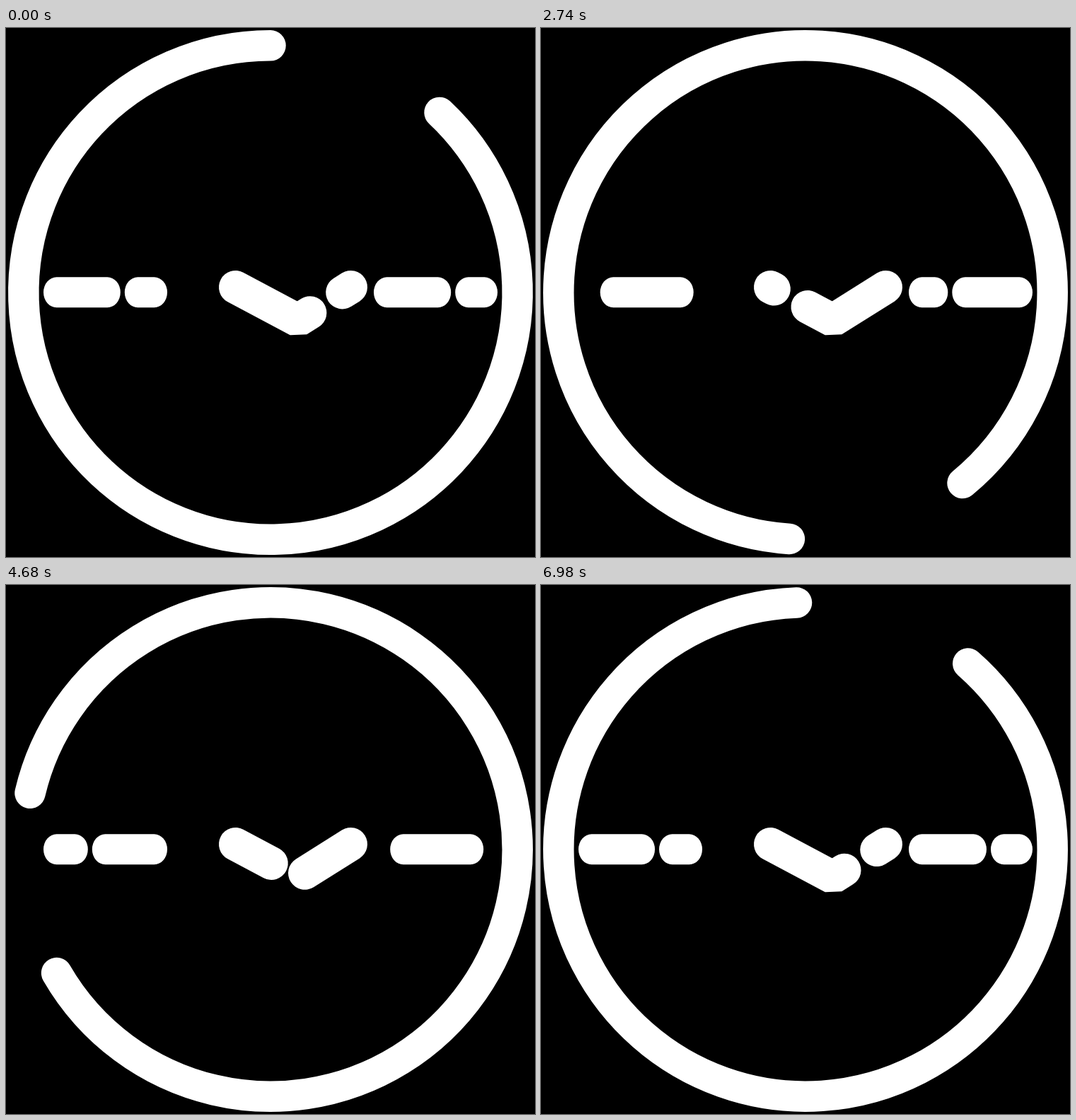
An HTML page with a canvas that plays this animation: 748 by 748 pixels, repeating every 7 s.

```html
<!DOCTYPE html>
<html lang="en">
<head>
<meta charset="utf-8">
<title>Clock loader</title>
<style>
  html, body { margin: 0; width: 100%; height: 100%; overflow: hidden; background: #000; }
  canvas { display: block; }
</style>
</head>
<body>
<canvas id="stage" width="748" height="748"></canvas>
<script>
const ctx = document.getElementById('stage').getContext('2d');
const LOOP = 7000;
const TURN = 7020; // a full turn is slightly longer than the loop
const SQUASH = 37 / 43; // horizontal squash of the bar caps

// Strokes a polyline with one gap that travels along it and wraps around.
function gapLine(points, width, gapStart, gap, turn, squash = 1) {
  const pts = points.map(([x, y]) => [x / squash, y]);
  let length = 0;
  for (let i = 1; i < pts.length; i++) {
    length += Math.hypot(pts[i][0] - pts[i - 1][0], pts[i][1] - pts[i - 1][1]);
  }
  gap /= squash;
  const shift = gapStart / squash + gap + turn * length;
  ctx.save();
  ctx.scale(squash, 1);
  ctx.lineWidth = width;
  ctx.setLineDash([length - gap, gap]);
  ctx.lineDashOffset = -shift;
  ctx.beginPath();
  for (const p of pts) ctx.lineTo(...p);
  ctx.stroke();
  ctx.restore();
}

function ring(turn) {
  const start = turn * 2 * Math.PI - Math.PI / 2;
  const gap = 0.12 * 2 * Math.PI;
  ctx.lineWidth = 43.5;
  ctx.beginPath();
  ctx.arc(374, 374, 349.2, start + gap, start + 2 * Math.PI);
  ctx.stroke();
}

function bar(x, gapStart, turn) {
  gapLine([[x, 373.75], [x + 138, 373.75]], 43, gapStart, 43, turn, SQUASH);
}

function draw(time) {
  const turn = (time % LOOP) / TURN;
  ctx.fillStyle = '#000';
  ctx.fillRect(0, 0, 748, 748);
  ctx.strokeStyle = '#fff';
  ctx.lineCap = 'round';
  ctx.lineJoin = 'bevel';
  ring(turn);
  bar(71.5, 71.8, turn);
  bar(538.5, 72.2, -turn);
  gapLine([[324.5, 366.5], [412.8, 413.4], [487.5, 366.5]], 47, 120.2, 54, turn);
}

let origin;
function frame(now) {
  origin ??= now;
  draw(now - origin);
  requestAnimationFrame(frame);
}
draw(0);
requestAnimationFrame(frame);
</script>
</body>
</html>
```
